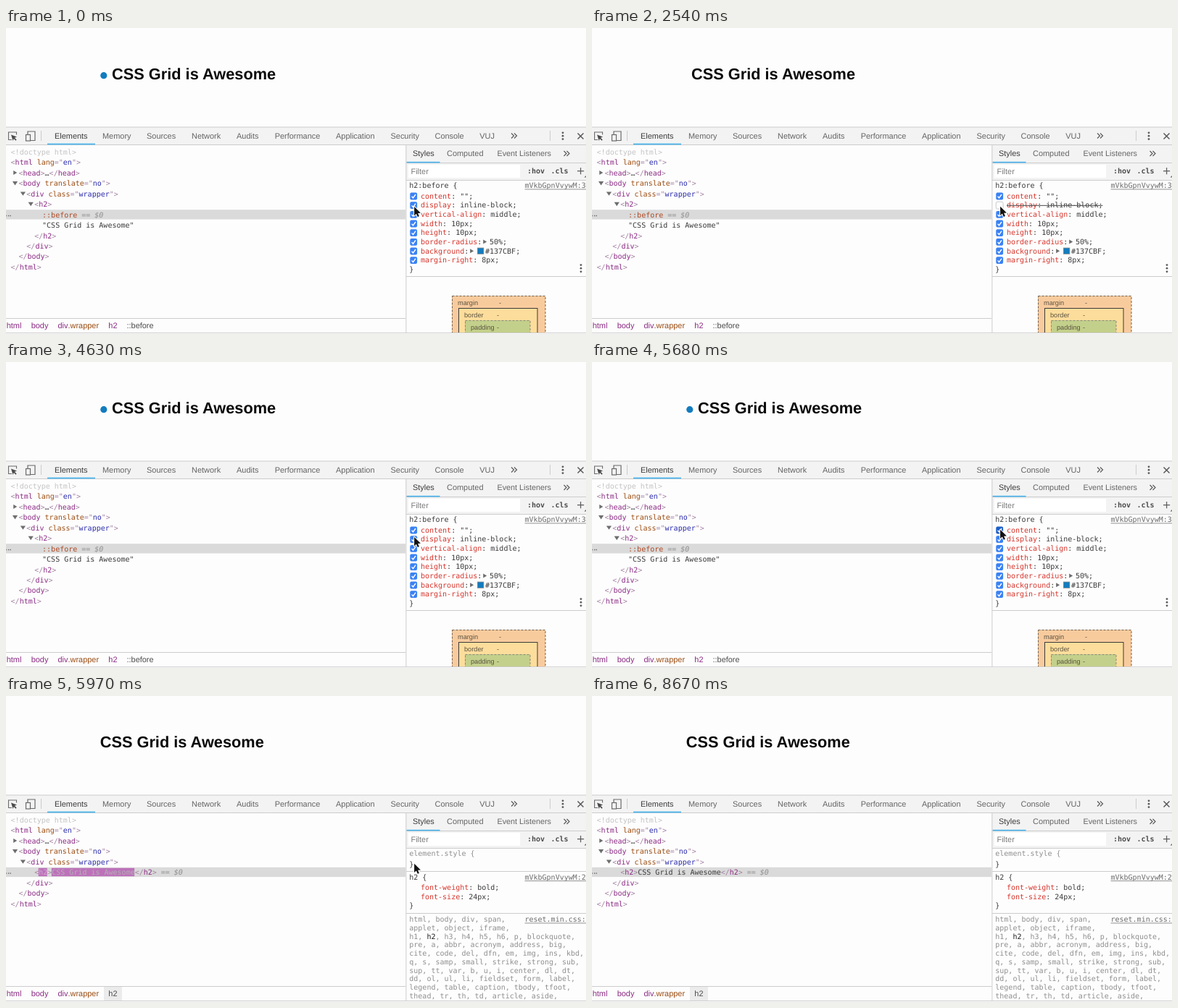
An HTML page with a canvas that plays this animation: 800 px wide and 423 px high, repeating every 8.97 s.

```html
<!DOCTYPE html>
<html lang="en">
<head>
<meta charset="utf-8">
<title>Pseudo-element display toggle</title>
<style>
html, body { margin: 0; width: 100%; height: 100%; overflow: hidden; background: #fdfdfd; }
canvas { display: block; }
</style>
</head>
<body>
<canvas id="stage" width="800" height="423"></canvas>
<script>
const ctx = document.getElementById('stage').getContext('2d');
const LOOP = 8970;
const MONO = '10px "DejaVu Sans Mono", monospace';
const SANS = '10.95px "Liberation Sans", Arial, sans-serif';
const CHAR = 6.02;
const PAPER = '#fdfdfd', BAR = '#f3f3f3', LINE = '#cccccc', INK = '#3a3a3a', GREY = '#8f8f8f';
const TAG = '#8b2a84', ATTR = '#9c4d12', VALUE = '#2c2cab', PUNCT = '#a583a3', PROP = '#d6362d';
const TAB = '#646464', ACCENT = '#4db4ec';

// Pointer tip: [start time, x, y]
const POINTER = [
  [0, 563.1, 247], [450, 563.1, 248.4], [2540, 563.1, 246.8], [4630, 563.1, 242],
  [4780, 563.1, 237.4], [4930, 563.1, 235.4], [5080, 563.1, 233.4], [5230, 562.6, 231.2],
  [5380, 563.1, 231.7], [8520, 590, 322.5], [8670, -50, -50]
];

function rect(x, y, w, h, color) {
  ctx.fillStyle = color;
  ctx.fillRect(x, y, w, h);
}

function text(str, x, y, color, font = SANS) {
  ctx.font = font;
  ctx.fillStyle = color;
  ctx.fillText(str, x, y);
}

// Monospaced run of alternating strings and colours
function code(x, y, ...parts) {
  for (let i = 0; i < parts.length; i += 2) {
    text(parts[i], x, y, parts[i + 1], MONO);
    x += parts[i].length * CHAR;
  }
  return x;
}

function stroke(points, color, width = 1) {
  ctx.beginPath();
  points.forEach(([x, y]) => ctx.lineTo(x, y));
  ctx.strokeStyle = color;
  ctx.lineWidth = width;
  ctx.stroke();
}

function shape(points, color) {
  ctx.beginPath();
  points.forEach(([x, y]) => ctx.lineTo(x, y));
  ctx.closePath();
  ctx.fillStyle = color;
  ctx.fill();
}

function dot(x, y, r, color) {
  ctx.beginPath();
  ctx.arc(x, y, r, 0, Math.PI * 2);
  ctx.fillStyle = color;
  ctx.fill();
}

function chevrons(x, y) {
  for (const dx of [0, 4]) {
    stroke([[x + dx, y - 3.5], [x + dx + 3.5, y], [x + dx, y + 3.5]], '#606060', 1.3);
  }
}

function kebab(x, y, gap = 4.6) {
  for (const k of [-1, 0, 1]) dot(x, y + k * gap, 1.4, '#5a5a5a');
}

function arrowRight(x, y) {
  shape([[x, y - 3], [x + 5, y], [x, y + 3]], '#6e6e6e');
}

function arrowDown(x, y) {
  shape([[x - 3.6, y - 2.6], [x + 3.6, y - 2.6], [x, y + 2.8]], '#6e6e6e');
}

function checkbox(y, on, pressed) {
  ctx.beginPath();
  ctx.roundRect(557.3, y - 4.8, 9.8, 9.8, 2);
  ctx.fillStyle = on ? (pressed ? '#1d5fc9' : '#3a82f4') : (pressed ? '#dedede' : '#ffffff');
  ctx.fill();
  if (on) {
    stroke([[559.6, y + .3], [561.5, y + 2.5], [565, y - 2.4]], '#fff', 1.4);
  } else {
    ctx.strokeStyle = '#bdbdbd';
    ctx.lineWidth = .8;
    ctx.stroke();
  }
}

function pointer(x, y) {
  ctx.beginPath();
  [[0, 0], [0, 12.4], [2.8, 9.8], [4.7, 14.1], [6.8, 13.2], [5, 9], [8.8, 8.8]]
    .forEach(([dx, dy]) => ctx.lineTo(x + dx, y + dy));
  ctx.closePath();
  ctx.lineJoin = 'round';
  ctx.strokeStyle = '#fff';
  ctx.lineWidth = 2;
  ctx.stroke();
  ctx.fillStyle = '#111';
  ctx.fill();
  ctx.lineJoin = 'miter';
}

function page(mode) {
  const left = 130;
  const shift = { dot: 16.4, inline: 7.3, none: 0 }[mode];
  if (mode === 'dot') dot(left + 4.8, 65.7, 4.6, '#137cbf');
  text('CSS Grid is Awesome', left + shift - .3, 71.3, '#0a0a0a',
    'bold 21.75px "Liberation Sans", Arial, sans-serif');
}

function toolbar() {
  rect(0, 137, 800, 25, BAR);
  rect(0, 136.5, 800, 1, LINE);
  rect(0, 161, 800, 1, LINE);
  rect(57, 159.6, 66, 1.8, ACCENT);
  const tabs = [['Elements', 67], ['Memory', 133], ['Sources', 194], ['Network', 256], ['Audits', 318],
    ['Performance', 370.7], ['Application', 455], ['Security', 530.5], ['Console', 591.5], ['VUJ', 653.3]];
  tabs.forEach(([name, x], i) => text(name, x, 153, i ? TAB : '#3c3c3c'));
  chevrons(697, 149);

  // Inspect and device icons
  stroke([[8, 154.5], [3.5, 154.5], [3.5, 144], [14.5, 144], [14.5, 147.5]], '#6a6a6a', 1.1);
  shape([[7, 147.5], [15, 150.6], [11.9, 151.8], [14.6, 154.6], [13.4, 155.7], [10.8, 153], [9.6, 156]], '#4a4a4a');
  stroke([[30, 147], [30, 143], [40, 143], [40, 155.5], [34, 155.5]], '#6a6a6a', 1.2);
  ctx.strokeRect(27.5, 147.5, 6, 8.5);
  rect(48, 142, 1, 14, LINE);
  rect(750, 142, 1, 14, LINE);
  kebab(768, 149.2, 4.4);
  stroke([[788.5, 145.5], [796.5, 153.5]], '#555', 1.5);
  stroke([[796.5, 145.5], [788.5, 153.5]], '#555', 1.5);
}

function sidebarHead() {
  rect(551, 162, 249, 49, BAR);
  rect(552, 186, 248, 1, LINE);
  rect(552.5, 184.8, 46, 1.7, ACCENT);
  text('Styles', 561, 177.3, '#3c3c3c');
  text('Computed', 608, 177.3, TAB);
  text('Event Listeners', 677.5, 177.3, TAB, SANS.replace('10.95', '10.8'));
  chevrons(769.5, 173.5);
  rect(555, 189, 154, 18, '#fff');
  text('Filter', 558.5, 201.5, '#7c7c7c');
  text(':hov', 719, 201.3, '#4c4c4c', 'bold ' + MONO);
  text('.cls', 751.5, 201.3, '#4c4c4c', 'bold ' + MONO);
  stroke([[788, 197.7], [797.2, 197.7]], '#606060', 1.3);
  stroke([[792.6, 193.1], [792.6, 202.3]], '#606060', 1.3);
  shape([[800, 204], [800, 206.5], [797.5, 206.5]], '#666');
  rect(552, 210, 248, 1, LINE);
}

const indent = n => 6.6 + 10.87 * n;
const rowY = n => 175 + 14.44 * n;

function openTag(depth, row, name, attr, value) {
  const parts = ['<', PUNCT, name, TAG];
  if (attr) parts.push(' ' + attr, ATTR, '="', PUNCT, value, VALUE, '"', PUNCT);
  return code(indent(depth), rowY(row), ...parts, '>', PUNCT);
}

function closeTag(x, row, name) {
  return code(x, rowY(row), '</', PUNCT, name, TAG, '>', PUNCT);
}

function selectRow(row) {
  const y = rowY(row) - 10.4;
  rect(0, y, 551, 13.3, '#dadada');
  for (const x of [0, 3.4, 6]) rect(x - .6, y + 7.6, 1.4, 1.4, '#666');
}

function selectedMark(x, row) {
  text('== ', x + CHAR, rowY(row), GREY, MONO);
  text('$0', x + CHAR * 4, rowY(row), GREY, 'italic ' + MONO);
}

const mix = (a, b, k) => a.map((v, i) => v + (b[i] - v) * k);
const rgb = c => `rgb(${c.map(Math.round).join(',')})`;

// y of cubic-bezier(0, 0, .2, 1)
function easeOut(x) {
  let lo = 0, hi = 1;
  for (let i = 0; i < 20; i++) {
    const s = (lo + hi) / 2;
    if (.6 * s * s + .4 * s * s * s < x) lo = s; else hi = s;
  }
  return lo * lo * (3 - 2 * lo);
}

// Flash of a changed node, sampled in held steps
function flashAmount(t) {
  if (t < 5830 || t >= 7020) return null;
  const step = [6720, 6420, 6270, 6120, 5970, 5830].find(s => t >= s);
  return easeOut((step - 5830) / 1120);
}

function tree(pseudo, t) {
  text('<!doctype html>', indent(0), rowY(0), '#c4c4c4', MONO);
  openTag(0, 1, 'html', 'lang', 'en');
  arrowRight(10.2, 200);
  let x = openTag(1, 2, 'head');
  x = code(x, rowY(2), '…', INK);
  closeTag(x, 2, 'head');
  arrowDown(12.5, 214.6);
  openTag(1, 3, 'body', 'translate', 'no');
  arrowDown(23.4, 229);
  openTag(2, 4, 'div', 'class', 'wrapper');

  if (pseudo) {
    arrowDown(34.2, 243.4);
    openTag(3, 5, 'h2');
    selectRow(6);
    x = code(indent(4), rowY(6), '::before', '#ad4a25');
    selectedMark(x, 6);
    code(indent(4), rowY(7), '"CSS Grid is Awesome"', INK);
    closeTag(indent(3), 8, 'h2');
  } else {
    selectRow(5);
    const k = flashAmount(t);
    const name = indent(3) + CHAR, body = indent(3) + CHAR * 4;
    let tagColor = TAG, bodyColor = INK;
    if (k !== null) {
      const fill = rgb(mix([158, 54, 153], [245, 219, 244], k));
      rect(name - .5, 237.8, CHAR * 2, 11.4, fill);
      rect(body - .5, 237.8, CHAR * 19, 11.4, fill);
      tagColor = rgb(mix([255, 255, 255], [136, 18, 128], k));
      bodyColor = rgb(mix([255, 255, 255], [43, 43, 43], k));
    }
    x = code(indent(3), rowY(5), '<', PUNCT, 'h2', tagColor, '>', PUNCT, 'CSS Grid is Awesome', bodyColor);
    selectedMark(closeTag(x, 5, 'h2'), 5);
  }
  const end = pseudo ? 9 : 6;
  ['div', 'body', 'html'].forEach((tag, i) => closeTag(indent(2 - i), end + i, tag));
}

function crumbs(pseudo) {
  rect(0, 401, 551, 1, LINE);
  if (!pseudo) rect(135, 402, 25, 19, '#ebebeb');
  text('html', .7, 415, TAG);
  text('body', 34.7, 415, TAG);
  text('div', 71.5, 415, TAG);
  text('.wrapper', 85.5, 415, ATTR);
  text('h2', 141.3, 415, pseudo ? TAG : '#4c4c4c');
  if (pseudo) text('::before', 166.5, 415, '#4c4c4c');
}

function link(str, y) {
  code(715.5, y, str, '#6c6c6c');
  rect(715.5, y + 1.2, 84.5, .9, '#858585');
}

function pseudoRule(t) {
  const off = t >= 890 && t < 2990;
  const pressed = (t >= 740 && t < 890) || (t >= 2840 && t < 2990) ? 1 : t >= 5680 ? 0 : -1;
  code(556.3, 221.3, 'h2:before {', INK);
  link('mVkbGpnVvywM:3', 221.3);
  const rules = [['content', '"";'], ['display', 'inline-block;'], ['vertical-align', 'middle;'],
    ['width', '10px;'], ['height', '10px;'], ['border-radius', '50%;'],
    ['background', '#137CBF;'], ['margin-right', '8px;']];
  rules.forEach(([prop, value], i) => {
    const mid = 232.4 + i * 12.67, y = mid + 3.2;
    const hidden = off && i === 1;
    checkbox(mid, !hidden, pressed === i);
    let x = code(572, y, prop, PROP, ':', INK);
    if (i === 5 || i === 6) {
      arrowRight(x + 1.9, mid - .2);
      x += 4.7;
    }
    if (i === 6) {
      rect(650, mid - 4.8, 9.2, 9.2, '#8b8b8b');
      rect(650.8, mid - 4, 7.6, 7.6, '#137cbf');
      x = 661 - CHAR;
    }
    x = code(x + CHAR, y, value, INK);
    if (hidden) rect(572, mid - .2, x - 572, 1, '#4c4c4c');
  });
  code(556.3, 336.5, '}', INK);
  kebab(793, 332.2);
  rect(552, 343, 248, 1, LINE);
  boxModel();
}

function boxModel() {
  const boxes = [
    ['margin', 615, 370, 129, '#f8cb9d', '#6b6256', [3, 2], 680],
    ['border', 624, 387, 109, '#fddd9b', '#3a3a3a', [], 677],
    ['padding', 633, 404, 90, '#c3d08b', '#8a8a78', [3, 2], 677]
  ];
  for (const [name, x, y, w, fill, edge, dash, mark] of boxes) {
    rect(x, y, w, 60, fill);
    ctx.setLineDash(dash);
    ctx.strokeStyle = edge;
    ctx.lineWidth = 1;
    ctx.strokeRect(x + .5, y + .5, w - .5, 60);
    const font = SANS.replace('10.95', '9.2');
    text(name, x + 8, y + 12.9, '#5a5342', font);
    text('-', mark, y + 12.9, '#5a5342', font);
  }
  ctx.setLineDash([]);
}

function plainRules(t) {
  const hover = t >= 8520 && t < 8670;
  code(556.3, 221.3, 'element.style {', GREY);
  code(556.3, 235.5, '}', INK);
  rect(552, 242, 248, 1, LINE);
  code(556.3, 254, 'h2 {', INK);
  link('mVkbGpnVvywM:2', 254);
  code(572, 268.3, 'font-weight', PROP, ': bold;', INK);
  code(572, 281, 'font-size', PROP, ': 24px;', INK);
  code(556.3, 293, '}', INK);
  rect(552, 300, 248, 1, LINE);
  link('reset.min.css:1', 312.3);
  const selectors = ['html, body, div, span,', 'applet, object, iframe,',
    'h1, h2, h3, h4, h5, h6, p, blockquote,', 'pre, a, abbr, acronym, address, big,',
    'cite, code, del, dfn, em, img, ins, kbd,', 'q, s, samp, small, strike, strong, sub,',
    'sup, tt, var, b, u, i, center, dl, dt,', 'dd, ol, ul, li, fieldset, form, label,',
    'legend, table, caption, tbody, tfoot,', 'thead, tr, th, td, article, aside,'];
  selectors.forEach((line, i) => {
    const y = 312.3 + i * 11.72;
    if (i === 2) code(556.3, y, 'h1, ', GREY, 'h2', '#1c1c1c', line.slice(6), GREY);
    else code(556.3, y, line, GREY);
  });
  if (t >= 7320 && t < 8520) kebab(793, 231.2);
  if (hover) {
    checkbox(265.2, true, false);
    checkbox(277.9, true, false);
    kebab(793, 288.5);
  }
}

function draw(t) {
  const pseudo = t < 5830;
  rect(0, 0, 800, 423, PAPER);
  page(!pseudo ? 'none' : t >= 890 && t < 2990 ? 'inline' : 'dot');
  toolbar();
  tree(pseudo, t);
  crumbs(pseudo);
  sidebarHead();
  if (pseudo) pseudoRule(t);
  else if (t >= 5970) plainRules(t);
  rect(551.4, 162, 1, 260, LINE);
  rect(0, 421, 800, 1, LINE);
  rect(0, 422, 800, 1, PAPER);
  const [, x, y] = POINTER.findLast(p => t >= p[0]);
  pointer(x, y);
}

ctx.textRendering = 'geometricPrecision';
const start = performance.now();
function tick() {
  draw((performance.now() - start) % LOOP);
  requestAnimationFrame(tick);
}
tick();
</script>
</body>
</html>
```
